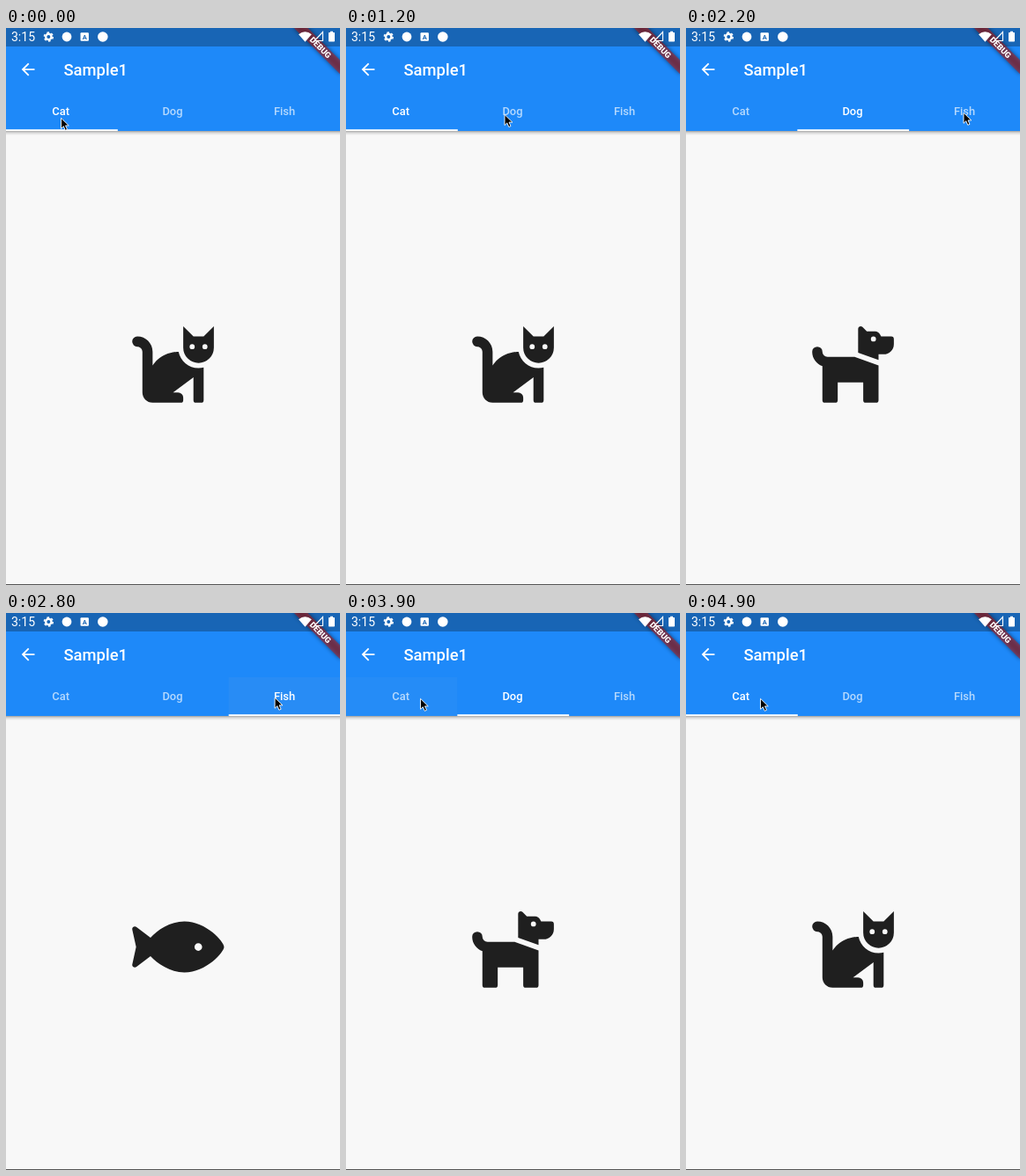
Animation of 379 by 633 pixels, one loop 5000 ms. Source, as an HTML page:

```html
<!DOCTYPE html>
<html lang="en">
<head>
<meta charset="utf-8">
<title>Tabs</title>
<style>
  html, body { margin: 0; height: 100%; overflow: hidden; background: #f8f8f8; }
  svg { display: block; width: 100vw; height: 100vh; }
  text { font-family: Roboto, sans-serif; font-weight: 500; fill: #fff; }
  .tab { font-size: 12.9px; text-anchor: middle; }
</style>
</head>
<body>
<svg viewBox="0 0 379 633">
  <defs>
    <linearGradient id="shade" x2="0" y2="1">
      <stop stop-opacity=".36"/>
      <stop offset=".4" stop-opacity=".13"/>
      <stop offset="1" stop-opacity="0"/>
    </linearGradient>
    <filter id="blur" x="-20%" y="-80%" width="140%" height="260%"><feGaussianBlur stdDeviation="2.5"/></filter>
  </defs>
  <rect width="379" height="633" fill="#f8f8f8"/>

  <g id="pages" fill="#1f1f1f" fill-rule="evenodd">
    <path transform="translate(143.2 333.2) scale(.181)" d="M290.6 192c-20.2 0-106.8 2-162.6 86V192c0-53-43-96-96-96a32 32 0 0 0 0 64c17.6 0 32 14.4 32 32v256c0 35.3 28.7 64 64 64h176a16 16 0 0 0 16-16v-16a32 32 0 0 0-32-32h-32l128-96v144a16 16 0 0 0 16 16h32a16 16 0 0 0 16-16V289.9c-10.3 2.6-20.9 4.5-32 4.5-61.8 0-113.5-44-125.4-102.4zM448 96h-64l-64-64v134.4a96 96 0 0 0 192 0V32zM360 160a16 16 0 0 1 32 0a16 16 0 0 1-32 0zm80 0a16 16 0 0 1 32 0a16 16 0 0 1-32 0z"/>
    <path transform="translate(516.4 333.2) scale(.181)" d="M298 224l150 53.5V496a16 16 0 0 1-16 16h-64a16 16 0 0 1-16-16V384H192v112a16 16 0 0 1-16 16h-64a16 16 0 0 1-16-16V282c-37-13-64-48-64-90a32 32 0 0 1 64 0a32 32 0 0 0 32 32zM544 112v32a64 64 0 0 1-64 64h-32v35.6l-128-45.7V48c0-14.3 17.2-21.4 27.3-11.3L374.6 64h53.2c10.9 0 23.7 7.9 28.6 17.7L464 96h64a16 16 0 0 1 16 16zm-112 0a16 16 0 1 0-32 0a16 16 0 0 0 32 0z"/>
    <path transform="translate(901.2 333.2) scale(.181)" d="M327 96c-90 0-168.5 54.8-212.2 101.6L27.5 131.6c-12.1-9.2-30.2.6-27.1 14.6L24.5 256 .4 365.8c-3.1 14 15 23.8 27.1 14.6l87.3-66C158.5 361.2 237 416 327 416 464.6 416 576 288 576 256S464.6 96 327 96zM390.5 256a24 24 0 0 1 48 0a24 24 0 0 1-48 0z"/>
  </g>

  <rect y="117" width="379" height="5" fill="url(#shade)"/>
  <rect width="379" height="117" fill="#1e89f9"/>
  <rect width="379" height="21" fill="#1865b5"/>
  <rect id="press" y="73" width="126.33" height="44" fill="#bcbcbc"/>
  <path fill="#fff" transform="translate(14 36) scale(.922)" d="M20 11H7.8l5.6-5.6L12 4l-8 8 8 8 1.4-1.4L7.8 13H20z"/>
  <text x="65.5" y="53.6" font-size="18.4">Sample1</text>
  <text class="tab" x="62.2" y="98.8">Cat</text>
  <text class="tab" x="189" y="98.8">Dog</text>
  <text class="tab" x="316" y="98.8">Fish</text>
  <rect id="bar" y="115.2" width="126.8" height="1.9" fill="#fff"/>

  <g transform="translate(379 0) rotate(45)">
    <rect x="-37" y="25.8" width="74" height="11.1" opacity=".5" filter="url(#blur)"/>
    <rect x="-37" y="25.8" width="74" height="11.1" fill="#b71c1c" fill-opacity=".55"/>
    <text y="34.7" font-size="9.4" text-anchor="middle" style="font-weight:900">DEBUG</text>
  </g>

  <g fill="#fff">
    <text x="6" y="15" font-size="14" style="font-weight:400">3:15</text>
    <g fill="none" stroke="#fff">
      <circle cx="48.3" cy="10" r="3.2" stroke-width="2.4"/>
      <circle cx="48.3" cy="10" r="4.9" stroke-width="1.6" stroke-dasharray="2.6 2.53"/>
      <path d="M359.5 4.5v10h-9.5z" stroke-width="1.1"/>
    </g>
    <circle cx="69" cy="10" r="5.4"/>
    <rect x="84.5" y="5.3" width="9.4" height="9.4" rx="1"/>
    <text x="89.2" y="12.8" font-size="7.6" text-anchor="middle" style="fill:#1865b5;font-weight:700">A</text>
    <circle cx="109.8" cy="10" r="5.8"/>
    <path d="M332 7.3q7.4-6.2 14.8 0l-7.4 8.4z"/>
    <path d="M368 5v-1.3h3V5h1.2q.8 0 .8.8v8.9q0 .8-.8.8h-5.4q-.8 0-.8-.8V5.8q0-.8.8-.8z"/>
  </g>

  <rect y="632" width="379" height="1" fill="#555"/>
  <path id="cursor" d="M0 0v12l2.8-2.6 2 4.6 2.2-1-2-4.4h3.8z" stroke="#fff" stroke-width=".9"/>
</svg>
<script>
const LOOP = 5000, STEP = 100, WIDTH = 379, TAB = WIDTH / 3, SLIDE = 300;
const $ = id => document.getElementById(id);
const labels = document.querySelectorAll('.tab');

// time, tab chosen, delay before the page follows the bar
const taps = [[1353, 1, 57], [2430, 2, 60], [3400, 1, 65], [3975, 0, 99]];
// time, x, y of the pointer
const path = [
  [0, 62.5, 102.3], [410, 62.5, 102.3], [1200, 180, 98.5], [1650, 180, 98.5],
  [2150, 315, 96.3], [2700, 315, 96.3], [3250, 201, 95.8], [3500, 201, 95.8],
  [3900, 84.5, 97.3], [LOOP, 84.5, 97.3]
];

const clamp = v => Math.max(0, Math.min(1, v));
const mix = (a, b, k) => a + (b - a) * k;
const smooth = k => k * k * (3 - 2 * k);

// cubic-bezier(.25, .1, .25, 1)
function ease(x) {
  if (x <= 0 || x >= 1) return clamp(x);
  const curve = (a, b, s) => 3 * a * s * (1 - s) ** 2 + 3 * b * s * s * (1 - s) + s ** 3;
  let lo = 0, hi = 1;
  for (let i = 0; i < 24; i++) {
    const mid = (lo + hi) / 2;
    if (curve(.25, .25, mid) < x) lo = mid; else hi = mid;
  }
  return curve(.1, 1, lo);
}

function position(t, lagging) {
  let pos = 0;
  for (const [at, tab, lag] of taps)
    pos = mix(pos, tab, ease((t - at - (lagging ? lag : 0)) / SLIDE));
  return pos;
}

function pointer(t) {
  const i = path.findIndex(p => p[0] > t);
  const [a, b] = [path[i - 1], path[i]];
  const k = smooth((t - a[0]) / (b[0] - a[0]));
  return [mix(a[1], b[1], k), mix(a[2], b[2], k)];
}

function draw(t) {
  const page = position(t, true);
  $('pages').setAttribute('transform', `translate(${-page * WIDTH} 0)`);
  $('bar').setAttribute('x', position(t, false) * TAB);
  labels.forEach((el, i) =>
    el.setAttribute('fill-opacity', mix(1, .68, clamp(Math.abs(page - i)))));

  let glow = 0;
  for (const [at, tab] of taps) {
    const d = t - at;
    if (d <= -100 || d >= 450) continue;
    glow = .24 * Math.min(clamp((d + 100) / 150), clamp((450 - d) / 300));
    $('press').setAttribute('x', tab * TAB);
  }
  $('press').setAttribute('opacity', glow);
  $('cursor').setAttribute('transform', `translate(${pointer(t)})`);
}

const start = performance.now();
function tick() {
  const t = (performance.now() - start) % LOOP;
  draw(Math.floor(t / STEP) * STEP);
  requestAnimationFrame(tick);
}
tick();
</script>
</body>
</html>
```
